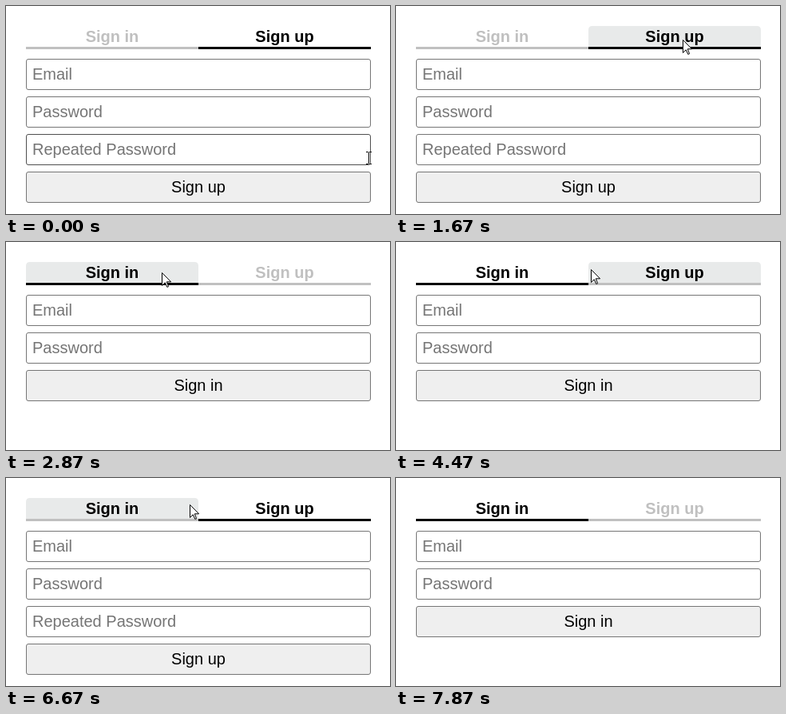
An HTML page that plays this animation: 481x260 px, repeating every 9.07 s.

```html
<!DOCTYPE html>
<html lang="en">
<head>
<meta charset="utf-8">
<title>Sign in / Sign up</title>
<style>
  html, body { margin: 0; width: 100%; height: 100%; overflow: hidden; background: #fff; }
  svg { display: block; width: 481px; height: 260px; }
  text { font: 20px Arial, "Liberation Sans", sans-serif; }
  .tab text { font-weight: bold; text-anchor: middle; }
  .box { fill: #fff; stroke: #767676; }
  .hint { fill: #757575; }
  #button .box { fill: #efefef; }
  #button text { text-anchor: middle; }
</style>
</head>
<body>
<svg viewBox="0 0 481 260">
  <g id="tabs"></g>
  <g id="fields"></g>
  <g id="button">
    <rect class="box" x="25.5" y=".5" width="431" height="38" rx="2.5"/>
    <text id="label" x="241" y="26"></text>
  </g>
  <path id="arrow" d="M.5 .5V16.5L4.3 12.8 6.8 18.4 8.6 17.7 6.3 11.8H11.6Z" fill="#fff" stroke="#000"/>
  <path id="beam" d="M-3 -7.5H0M1 -7.5H4M.5 -7V7M-3 7.5H0M1 7.5H4" fill="none" stroke="#000"/>
</svg>
<script>
const LOOP = 9070, TICKS_PER_MS = 0.015;
const LEFT = 25, RIGHT = 457, TAB_W = 216;
const $ = id => document.getElementById(id);

// Pointer moves: start tick, end tick, from, to, lift of the arc, timing skew
const moves = [
  [0, 13, [454, 190], [362, 42], 0, 1],
  [24, 36, [362, 42], [195, 38], -3, 1],
  [61, 75, [195, 38], [292, 42], -6, 0.81],
  [77, 78, [292, 42], [291, 42], 0, 1],
  [92, 105, [291, 42], [184, 38], -7, 1.25],
  [113, 117, [184, 38], [470, 100], 0, 1]
];
const GONE = 118;
const clicks = [43, 76, 108];

const tabs = ["Sign in", "Sign up"].map((name, i) => {
  const x = LEFT + i * TAB_W;
  const g = add($("tabs"), "g", { class: "tab" });
  const back = add(g, "path", {
    d: `M${x} 51V30q0-5 5-5h${TAB_W - 10}q5 0 5 5V51z`, fill: "#e8eaea"
  });
  const line = add(g, "rect", { x, y: 51, width: TAB_W, height: 3 });
  const text = add(g, "text", { x: x + TAB_W / 2, y: 45 });
  text.textContent = name;
  return { name, x, back, line, text };
});

const fields = ["Email", "Password", "Repeated Password"].map((hint, i) => {
  const y = 66 + i * 47;
  const g = add($("fields"), "g", {});
  const box = add(g, "rect", { class: "box", x: 25.5, y: y + 0.5, width: 431, height: 38, rx: 2.5 });
  add(g, "text", { class: "hint", x: 33, y: y + 26 }).textContent = hint;
  return { y, g, box };
});

function add(parent, tag, attrs) {
  const el = document.createElementNS("http://www.w3.org/2000/svg", tag);
  for (const key in attrs) el.setAttribute(key, attrs[key]);
  return parent.appendChild(el);
}

function show(el, on) {
  el.style.display = on ? "" : "none";
}

function tickAt(ms) {
  const n = Math.floor(ms * TICKS_PER_MS) + 1;
  return Math.round(n / TICKS_PER_MS / 10) * 10 > ms ? n - 1 : n;
}

function pointerAt(n) {
  const [a, b, from, to, lift, skew] = moves.filter(m => n >= m[0]).pop();
  const p = Math.min(1, (n - a) / (b - a)) ** skew;
  const s = p * p * (3 - 2 * p);
  return [
    Math.round(from[0] + (to[0] - from[0]) * s),
    Math.round(from[1] + (to[1] - from[1]) * s + lift * 4 * s * (1 - s))
  ];
}

function draw(ms) {
  const n = tickAt(ms);
  const [x, y] = pointerAt(n);
  const seen = n < GONE;
  const signUp = clicks.filter(c => n >= c).length % 2 === 0;
  const active = signUp ? 1 : 0;

  tabs.forEach((tab, i) => {
    const over = seen && y >= 25 && y < 54 && x >= tab.x && x < tab.x + TAB_W;
    show(tab.back, over);
    tab.line.setAttribute("fill", i === active ? "#000" : "#c0c0c0");
    tab.text.setAttribute("fill", i === active || over ? "#000" : "#c0c0c0");
  });

  let typing = false;
  fields.forEach((field, i) => {
    const visible = i < 2 || signUp;
    const over = seen && visible && x >= LEFT && x < RIGHT && y >= field.y && y < field.y + 39;
    show(field.g, visible);
    field.box.style.stroke = over ? "#4f4f4f" : "";
    typing = typing || over;
  });

  $("button").setAttribute("transform", `translate(0 ${signUp ? 207 : 160})`);
  $("label").textContent = tabs[active].name;

  show($("arrow"), seen && !typing);
  show($("beam"), seen && typing);
  for (const id of ["arrow", "beam"]) $(id).setAttribute("transform", `translate(${x} ${y})`);
}

const start = performance.now();
function frame() {
  draw((performance.now() - start) % LOOP);
  requestAnimationFrame(frame);
}
frame();
</script>
</body>
</html>
```
